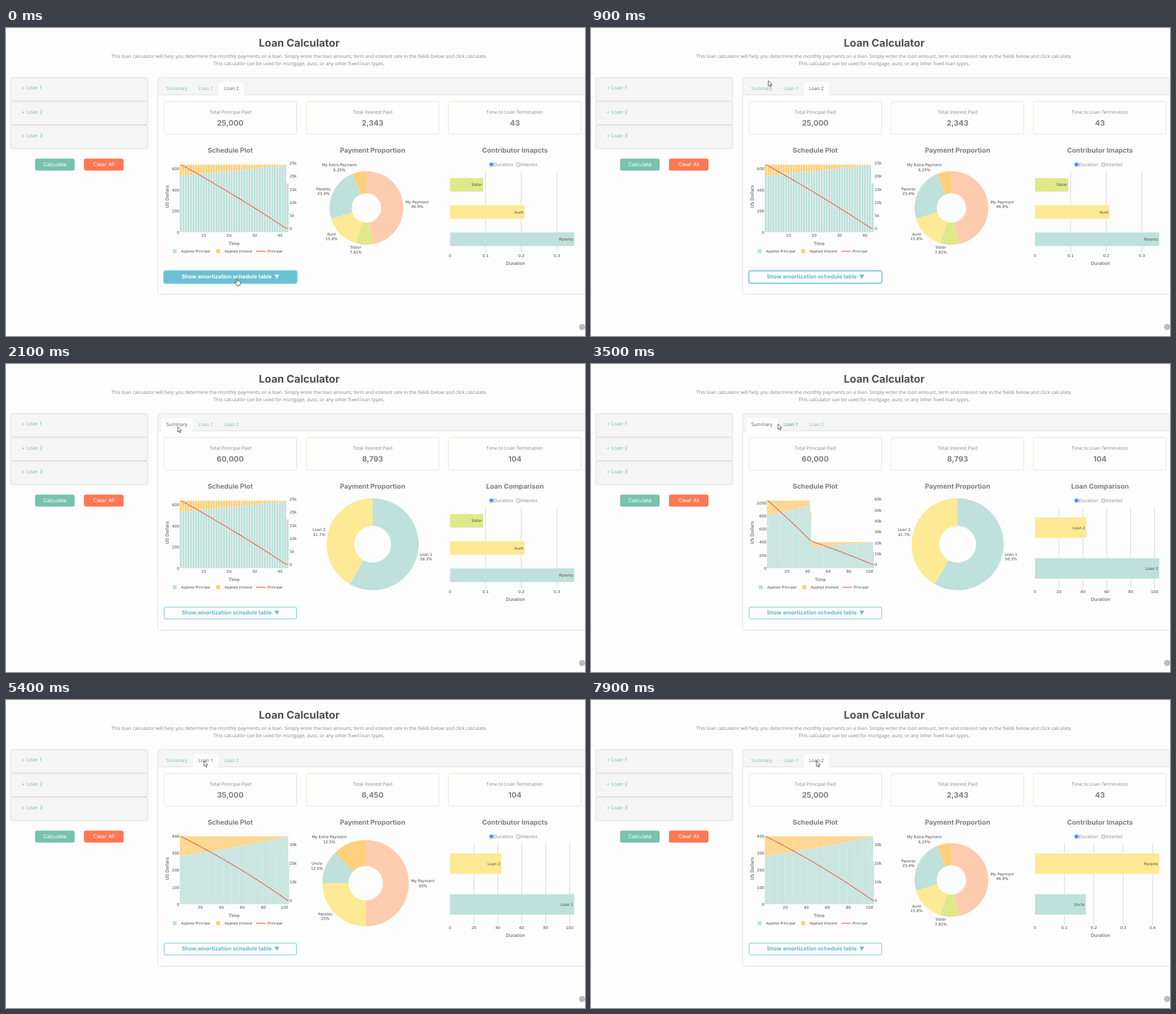
Recreate the animation shown at these times as an HTML page. Size 1025 by 546 pixels, loop 8000 ms.

```html
<!DOCTYPE html>
<html lang="en">
<head>
<meta charset="utf-8">
<title>Loan Calculator</title>
<style>
html, body { margin: 0; width: 100%; height: 100%; overflow: hidden; background: #fdfdfd; }
svg { display: block; width: 1025px; height: 546px; }
text { text-rendering: geometricPrecision; }
.head { font-family: Inter, sans-serif; font-weight: 700; fill: #7f7f7f; }
.nav { font-family: Inter, sans-serif; fill: #78c2ad; }
.body { font-family: "Open Sans", "Noto Sans", sans-serif; fill: #888; }
.plot { font-family: "DejaVu Sans", sans-serif; fill: #484848; }
</style>
</head>
<body>
<svg id="stage" viewBox="0 0 1025 546"></svg>
<script>
const NS = "http://www.w3.org/2000/svg";
const stage = document.getElementById("stage");
const LOOP = 8000;
const TEAL = "#bfe1db", YELLOW = "#fee994", ORANGE = "#fdd07c", PEACH = "#fdccae",
      LIME = "#e0e88c", RED = "#ee5a41", GREEN = "#78c2ad", BLUE = "#6bc0d4", EDGE = "#dcdce8";

function el(parent, tag, attrs) {
  const node = document.createElementNS(NS, tag);
  for (const key in attrs) node.setAttribute(key, attrs[key]);
  parent.appendChild(node);
  return node;
}
const group = (parent = stage) => el(parent, "g", {});
const rect = (p, x, y, width, height, attrs) => el(p, "rect", { x, y, width, height, ...attrs });
const path = (p, d, attrs) => el(p, "path", { d, ...attrs });

function text(p, str, x, y, size, cls, anchor = "middle", attrs = {}) {
  const node = el(p, "text", { x, y, "font-size": size, class: cls, "text-anchor": anchor, ...attrs });
  node.textContent = str;
  return node;
}

// ---------- page frame ----------
function drawPage() {
  text(stage, "Loan Calculator", 519, 33, 18.7, "head", "middle", { style: "fill:#505050" });
  text(stage, "This loan calculator will help you determine the monthly payments on a loan. Simply enter the loan amount, term and interest rate in the fields below and click calculate.",
    519, 53, 8.5, "body");
  text(stage, "This calculator can be used for mortgage, auto, or any other fixed loan types.", 519, 66.3, 8.5, "body");

  [88, 130, 172.5].forEach((y, i) => {
    rect(stage, 8.5, y, 242.5, 41.5, { rx: 3, fill: "#f5f5f5", stroke: "#d9d9e4" });
    text(stage, "+ Loan " + (i + 1), 27.5, [109.3, 152, 194.3][i], 9, "nav", "start");
  });
  [["Calculate", 51.5, GREEN], ["Clear All", 138, "#ff7851"]].forEach(([label, x, fill]) => {
    rect(stage, x, 231.5, 70, 21.3, { rx: 3.5, fill });
    text(stage, label, x + 35, 245.4, 9.45, "nav", "middle", { style: "fill:#fff" });
  });

  path(stage, "M1025 118.5H268.5V91.5q0-3.5 3.5-3.5H1025z", { fill: "#f5f5f5" });
  path(stage, "M1026 88H272q-3.5 0-3.5 3.5V468.500q0 3.500 3.500 3.500H1026", { fill: "none", stroke: EDGE });
  path(stage, "M268.5 118.5H1025", { stroke: EDGE });

  [280, 531.7, 783.3].forEach((x, i) => {
    rect(stage, x, 130, 234.5, 58, { rx: 3, fill: "#fdfdfd", stroke: "#e2e2d8" });
    text(stage, ["Total Principal Paid", "Total Interest Paid", "Time to Loan Termination"][i],
      x + 117.3, 151.8, 8.4, "body");
  });
  text(stage, "Schedule Plot", 397, 221.3, 11.9, "head");
  text(stage, "Payment Proportion", 649, 221.3, 11.9, "head");

  el(stage, "circle", { cx: 859.4, cy: 242, r: 3.3, fill: "#fff", stroke: "#1473e6", "stroke-width": 1 });
  el(stage, "circle", { cx: 859.4, cy: 242, r: 2.1, fill: "#1473e6" });
  el(stage, "circle", { cx: 907, cy: 242, r: 3.2, fill: "#fff", stroke: "#808080", "stroke-width": 0.8 });
  text(stage, "Duration", 863.3, 245.4, 8.4, "body", "start");
  text(stage, "Interest", 911, 245.4, 8.4, "body", "start");
  el(stage, "circle", { cx: 1019.8, cy: 530, r: 5.5, fill: "#bdbdbd" });
}

// ---------- tabs ----------
const TABS = [["Summary", 275, 330], ["Loan 1", 331.5, 376], ["Loan 2", 377, 421]];
function drawTabs() {
  return TABS.map(([label, a, b]) => {
    const back = path(stage, `M${a} 119.2V99q0-3 3-3H${b - 3}q3 0 3 3V119.2z`, { fill: "#fdfdfd" });
    const name = text(stage, label, (a + b) / 2, 110, 8.4, "body");
    return { back, name, a, b };
  });
}

// ---------- summary cards ----------
function drawCards(values, title) {
  const g = group();
  values.forEach((v, i) => text(g, v, 397 + 252 * i, 173, 13.2, "head"));
  text(g, title, 901, 221.3, 11.9, "head");
  return g;
}

// ---------- schedule plot ----------
function amortize(balance, rate, pay) {
  const rows = [];
  while (balance > 0.5) {
    const interest = balance * rate / 12;
    const principal = Math.min(pay - interest, balance);
    balance -= principal;
    rows.push({ principal, interest, balance });
  }
  return rows;
}
const loan1 = amortize(35000, 0.04, 400);
const loan2 = amortize(25000, 0.05, 640);
const both = loan1.map((row, i) => {
  const other = loan2[i] || { principal: 0, interest: 0, balance: 0 };
  return {
    principal: row.principal + other.principal,
    interest: row.interest + other.interest,
    balance: row.balance + other.balance
  };
});

function drawSchedule(rows, o) {
  const g = group(), base = 362, zero = 356, w = o.dx * 0.8;
  let teal = "", orange = "", line = "";
  rows.forEach((r, i) => {
    const x = o.x0 + o.dx * (i + 1);
    const y1 = base - r.principal * o.ky, y2 = y1 - r.interest * o.ky;
    const bar = (top, bottom) => `M${x - w / 2} ${bottom}V${top}h${w}V${bottom}z`;
    teal += bar(y1, base);
    orange += bar(y2, y1);
    line += (i ? "L" : "M") + x + " " + (zero - r.balance * o.kb);
  });
  path(g, teal, { fill: TEAL });
  path(g, orange, { fill: ORANGE });
  path(g, line, { fill: "none", stroke: RED, "stroke-width": 1.25, "stroke-linejoin": "round" });

  const s = o.shift;
  for (let v = 0; v <= o.yMax; v += o.yStep) text(g, v, 307 + s * 2, base - v * o.ky + 2.6, 6.9, "plot", "end");
  for (let v = 0; v <= o.bMax; v += o.bStep)
    text(g, v ? v + "k" : "0", 502, zero - v * 1000 * o.kb + 2.4, 6.9, "plot", "start");
  for (let v = o.xStep; v < rows.length; v += o.xStep) text(g, v, o.x0 + o.dx * v, 369.6, 6.9, "plot");
  text(g, "Time", 404 + s, 385.3, 7.85, "plot");
  text(g, "US Dollars", 0, 0, 7.85, "plot", "middle", { transform: "translate(287.6 299) rotate(-90)" });
  rect(g, 295 + s, 392.3, 7, 7, { fill: TEAL });
  rect(g, 372 + s, 392.3, 7, 7, { fill: ORANGE });
  path(g, `M${443 + s} 395.8h17`, { stroke: RED, "stroke-width": 1.3 });
  ["Applied Principal", "Applied Interest", "Principal"].forEach((label, i) =>
    text(g, label, [310, 387, 463][i] + s, 398.2, 6.2, "plot", "start"));
  return g;
}

// ---------- donut: slices are [label, percent, colour, label x, label y] ----------
function drawPie(cx, cy, R, slices) {
  const g = group(), r = R * 0.4;
  let from = 0;
  slices.forEach(([label, pct, fill, lx, ly]) => {
    const to = from + pct / 100;
    const at = (f, rad) => `${cx + rad * Math.sin(f * 2 * Math.PI)} ${cy - rad * Math.cos(f * 2 * Math.PI)}`;
    const big = pct > 50 ? 1 : 0;
    path(g, `M${at(from, R)}A${R} ${R} 0 ${big} 1 ${at(to, R)}L${at(to, r)}A${r} ${r} 0 ${big} 0 ${at(from, r)}z`, { fill });
    text(g, label, lx, ly, 6.75, "plot");
    text(g, pct + "%", lx, ly + 8.6, 6.75, "plot");
    from = to;
  });
  return g;
}

// ---------- horizontal bars: [label, right edge, colour] ----------
function drawBars(step, dx, ticks, bars) {
  const g = group(), slot = 144.5 / bars.length, h = slot / 2;
  for (let i = 0; i <= ticks; i++) {
    const x = 786 + dx * i;
    if (i) path(g, `M${x} 253.500V398.500`, { stroke: "#d2d2da", "stroke-width": 1 });
    text(g, +(step * i).toFixed(1), x, 405.6, 6.9, "plot");
  }
  bars.forEach(([label, right, fill], i) => {
    const y = 254 + slot * (i + 0.5) - h / 2;
    rect(g, 786, y, right - 786, h, { fill });
    text(g, label, right - 2, y + h / 2 + 2.4, 6.7, "plot", "end");
  });
  text(g, "Duration", 902, 420, 7.85, "plot");
  return g;
}

// ---------- button ----------
function drawButton() {
  const ring = rect(stage, 279, 430, 236.500, 23, { rx: 4, fill: "none", stroke: "#a4dae6", "stroke-width": 2 });
  const box = rect(stage, 280, 431, 234.5, 21, { rx: 3, stroke: BLUE });
  const ink = group();
  text(ink, "Show amortization schedule table", 311, 444.4, 9.65, "head", "start", { style: "fill:inherit" });
  path(ink, "M475.300 437.300h8.200l-4.100 7.400z");
  return { ring, box, ink };
}

// ---------- build; index 0 Summary, 1 Loan 1, 2 Loan 2 ----------
drawPage();
const tabs = drawTabs();
const views = {
  cards: [
    drawCards(["60,000", "8,793", "104"], "Loan Comparison"),
    drawCards(["35,000", "6,450", "104"], "Contributor Imapcts"),
    drawCards(["25,000", "2,343", "43"], "Contributor Imapcts")
  ],
  schedule: [
    drawSchedule(both, { x0: 310.5, dx: 1.825, ky: 0.1155, kb: 0.001933, yMax: 1000, yStep: 200, bMax: 60, bStep: 10, xStep: 20, shift: 2 }),
    drawSchedule(loan1, { x0: 306.75, dx: 1.8625, ky: 0.301, kb: 0.0033, yMax: 400, yStep: 100, bMax: 30, bStep: 10, xStep: 20, shift: 0 }),
    drawSchedule(loan2, { x0: 305, dx: 4.5, ky: 0.187, kb: 0.00466, yMax: 600, yStep: 200, bMax: 25, bStep: 5, xStep: 10, shift: 0 })
  ],
  pie: [
    drawPie(649, 319.5, 81.5, [["Loan 1", 58.3, TEAL, 743.5, 339.600], ["Loan 2", 41.7, YELLOW, 554.2, 296.3]]),
    drawPie(636.7, 324.8, 76.5, [["My Payment", 50, PEACH, 738, 323], ["Parents", 25, YELLOW, 565.3, 381.5],
      ["Uncle", 12.5, TEAL, 550.5, 292.3], ["My Extra Payment", 12.5, ORANGE, 572.2, 245]]),
    drawPie(638, 319, 65.3, [["My Payment", 46.9, PEACH, 728, 310.7], ["Sister", 7.81, LIME, 619.3, 391],
      ["Aunt", 15.6, YELLOW, 576.3, 367.7], ["Parents", 23.4, TEAL, 562, 287.8], ["My Extra Payment", 6.25, ORANGE, 590.2, 245]])
  ],
  bars: [
    drawBars(20, 42.35, 5, [["Loan 2", 877, YELLOW], ["Loan 1", 1006, TEAL]]),
    drawBars(0.1, 52.05, 4, [["Parents", 1006, YELLOW], ["Uncle", 876, TEAL]]),
    drawBars(0.1, 63.1, 3, [["Sister", 845, LIME], ["Aunt", 918, YELLOW], ["Parents", 1006, TEAL]])
  ]
};
const button = drawButton();
const arrow = path(stage, "M0 0V9.600L2.200 7.600L3.700 11L5.300 10.300L3.800 7H6.700z",
  { fill: "#fff", stroke: "#333", "stroke-width": 0.85, "stroke-linejoin": "round" });
const hand = path(stage, "M-1 1q0-1.200 1-1.200t1 1.200V4.500q1-.6 1.800.3q1-.5 1.700.4q1.500-.3 1.500 1.300V9q0 1.500-1 2.500V13H-.5V11.500L-3.500 7.700q-.4-1 .5-1.300q.8-.1 2 1.300z",
  { fill: "#fff", stroke: "#333", "stroke-width": 0.85, "stroke-linejoin": "round" });

// ---------- timing ----------
const steps = {
  tab: [[0, 2], [1500, 0], [4200, 1], [7600, 2]],
  cards: [[0, 2], [1700, 0], [4600, 1], [7700, 2]],
  pie: [[0, 2], [1900, 0], [5100, 1], [7800, 2]],
  schedule: [[0, 2], [2400, 0], [5200, 1]],
  bars: [[0, 2], [2600, 0], [5500, 1]]
};
const mouse = [[0, 409, 444], [100, 409, 444], [300, 396, 415], [600, 350, 230], [900, 314, 93.5], [1100, 307, 118],
  [1300, 304, 111], [3200, 304, 111], [3500, 331, 106], [3900, 350.5, 108], [6700, 350.5, 108],
  [7200, 375.5, 106], [7500, 399, 108], [LOOP, 399, 108]];

const stepAt = (list, t) => list.filter(s => s[0] <= t).pop()[1];
function mouseAt(t) {
  const i = mouse.findIndex(p => p[0] > t);
  const [t0, x0, y0] = mouse[i - 1], [t1, x1, y1] = mouse[i];
  const k = (t - t0) / (t1 - t0);
  return [x0 + (x1 - x0) * k, y0 + (y1 - y0) * k];
}
const show = (node, on) => node.setAttribute("visibility", on ? "visible" : "hidden");

function render(t) {
  const [x, y] = mouseAt(t);
  const active = stepAt(steps.tab, t);
  tabs.forEach((tab, i) => {
    const over = x >= tab.a - 1 && x < tab.b && y > 96 && y < 119;
    show(tab.back, i === active);
    tab.name.style.fill = i === active ? "#5f5f5f" : over ? "#4e9781" : GREEN;
  });
  for (const key in views) {
    const now = stepAt(steps[key], t);
    views[key].forEach((g, i) => show(g, i === now));
  }
  const hover = y > 430;
  show(button.ring, t < 1500);
  button.box.setAttribute("fill", hover ? BLUE : "#fdfdfd");
  button.ink.setAttribute("fill", hover ? "#fff" : "#62bbd0");
  show(hand, hover);
  show(arrow, !hover);
  (hover ? hand : arrow).setAttribute("transform", `translate(${x} ${y})`);
}

// the screen refreshes ten times a second
let last = -1;
function tick() {
  const t = Math.floor(performance.now() % LOOP / 100) * 100;
  if (t !== last) render(last = t);
  requestAnimationFrame(tick);
}
tick();
</script>
</body>
</html>
```
